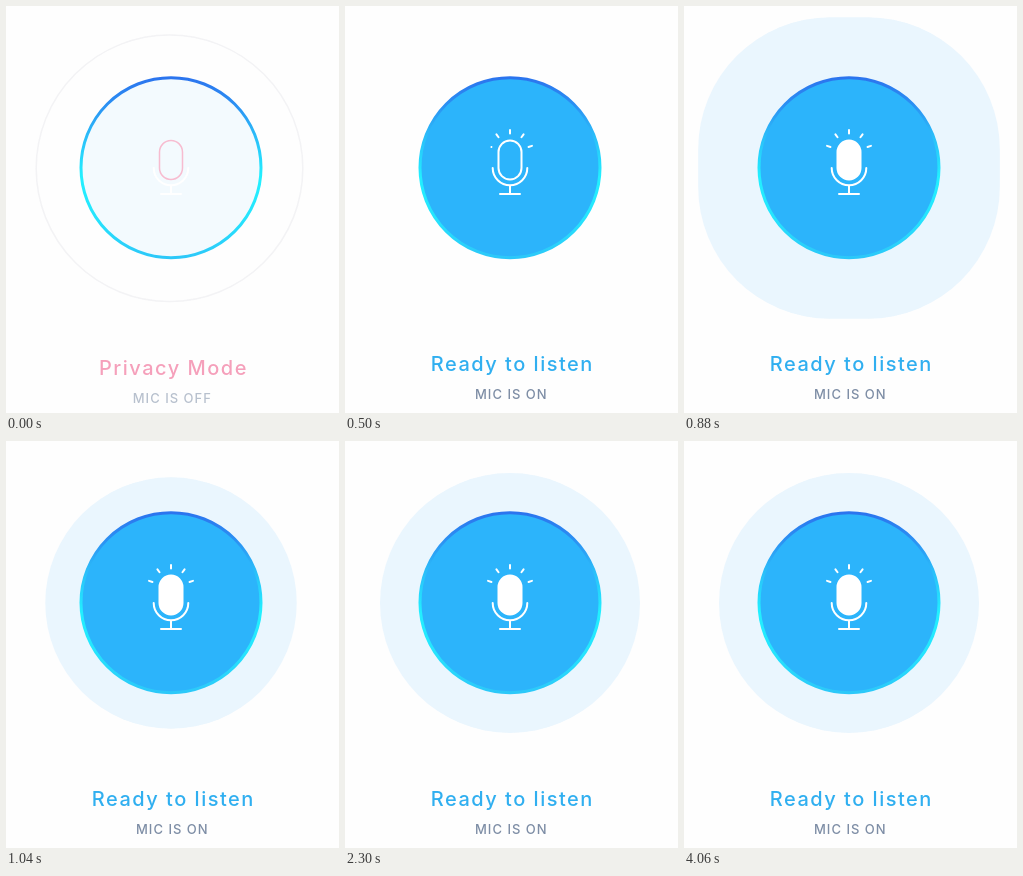
These frames come from a looping animation (333 by 407 pixels, 4100 ms). An HTML page:

```html
<!DOCTYPE html>
<html lang="en">
<head>
<meta charset="utf-8">
<title>Microphone button</title>
<style>
  html, body { margin: 0; width: 100%; height: 100%; overflow: hidden; background: #fefefe; }
  svg { display: block; }
  text { font-family: Inter, "Open Sans", sans-serif; font-weight: 500; text-anchor: middle; }
  .title { font-size: 20px; letter-spacing: 1.5px; }
  .note { font-size: 13px; letter-spacing: 1px; fill: #7d8da5; }
</style>
</head>
<body>
<svg width="333" height="407" viewBox="0 0 333 407" fill="none">
  <defs>
    <linearGradient id="rim" x1="0" y1="0" x2="0" y2="1">
      <stop offset="0" stop-color="#2b74ee"/>
      <stop offset=".15" stop-color="#2b90f3"/>
      <stop offset=".32" stop-color="#2bbcf9"/>
      <stop offset=".55" stop-color="#22f0ff"/>
      <stop offset=".78" stop-color="#26e4fd"/>
      <stop offset="1" stop-color="#2cc8f9"/>
    </linearGradient>
  </defs>
  <circle id="halo" cx="163.5" cy="162.3" r="133.3" stroke="#f3f3f5" stroke-width="1.5"/>
  <rect id="blob" fill="#eaf6fe"/>
  <circle cx="165" cy="161.7" r="90" fill="#fefefe"/>
  <circle id="disc" cx="165" cy="161.7" r="90" fill="#2cb4fb"/>
  <circle cx="165" cy="161.7" r="90" stroke="url(#rim)" stroke-width="3"/>
  <g stroke="#fff" stroke-width="2" stroke-linecap="round">
    <path d="M147.7 162a17.3 17.3 0 0 0 34.6 0M165 179.5v8.5M155 188h20"/>
    <rect id="capsule" x="153.5" y="134.5" width="23" height="39" rx="11.5" fill="#fff"/>
    <g id="rays"></g>
  </g>
  <g id="off">
    <text class="title" x="167.5" y="365" fill="#f5a0bb">Privacy Mode</text>
    <text class="note" x="166.3" y="393" opacity=".55">MIC IS OFF</text>
  </g>
  <g id="on">
    <text class="title" x="167.3" y="365" fill="#30aff0">Ready to listen</text>
    <text class="note" x="166.3" y="393">MIC IS ON</text>
  </g>
</svg>
<script>
const LOOP = 4100;
const $ = id => document.getElementById(id);
const set = (el, attrs) => { for (const k in attrs) el.setAttribute(k, attrs[k]); };
const ramp = (t, from, to) => Math.min(1, Math.max(0, (t - from) / (to - from)));
const easeOut = u => 1 - (1 - u) ** 2;
const mix = (a, b, u) => a + (b - a) * u;

// Rays light up from right to left
const rays = [72, 36, 0, -36, -72].map(angle => {
  const ray = document.createElementNS("http://www.w3.org/2000/svg", "path");
  set(ray, { transform: `translate(165 147) rotate(${angle})` });
  return $("rays").appendChild(ray);
});

// Grows at constant speed, then rings around its resting size
function blobRadius(t) {
  const s = (t - 830) / 1000, w = 2 * Math.PI / 0.38;
  return s < 0 ? Math.max(0, 130 + 36 * w * s) : 130 + 36 * Math.exp(-5 * s) * Math.sin(w * s);
}

function draw(t) {
  set($("halo"), { opacity: 1 - ramp(t, 0, 160) });
  set($("disc"), { opacity: mix(.05, 1, ramp(t, 0, 500)) });

  const r = blobRadius(t);
  set($("blob"), { x: 165 - r, y: 162 - r, width: 2 * r, height: 2 * r, rx: Math.min(r, 132) });

  const white = ramp(t, 0, 160);
  set($("capsule"), {
    stroke: `rgb(${mix(247, 255, white)} ${mix(188, 255, white)} ${mix(208, 255, white)})`,
    "stroke-width": mix(1.5, 2, white),
    "fill-opacity": ramp(t, 560, 740)
  });

  rays.forEach((ray, i) => {
    const u = ramp(t, 100 + 100 * i, 180 + 100 * i);
    set(ray, { d: `M0-19.5v${-3.6 * u}`, opacity: u > 0 ? 1 : 0 });
  });

  const out = ramp(t, 0, 140), into = easeOut(ramp(t, 120, 460));
  set($("off"), { opacity: 1 - out, transform: `translate(0 ${mix(4, 18, out)})` });
  set($("on"), { opacity: into, transform: `translate(0 ${mix(21, 0, into)})` });
}

const start = performance.now();
function tick() {
  draw((performance.now() - start) % LOOP);
  requestAnimationFrame(tick);
}
tick();
</script>
</body>
</html>
```
